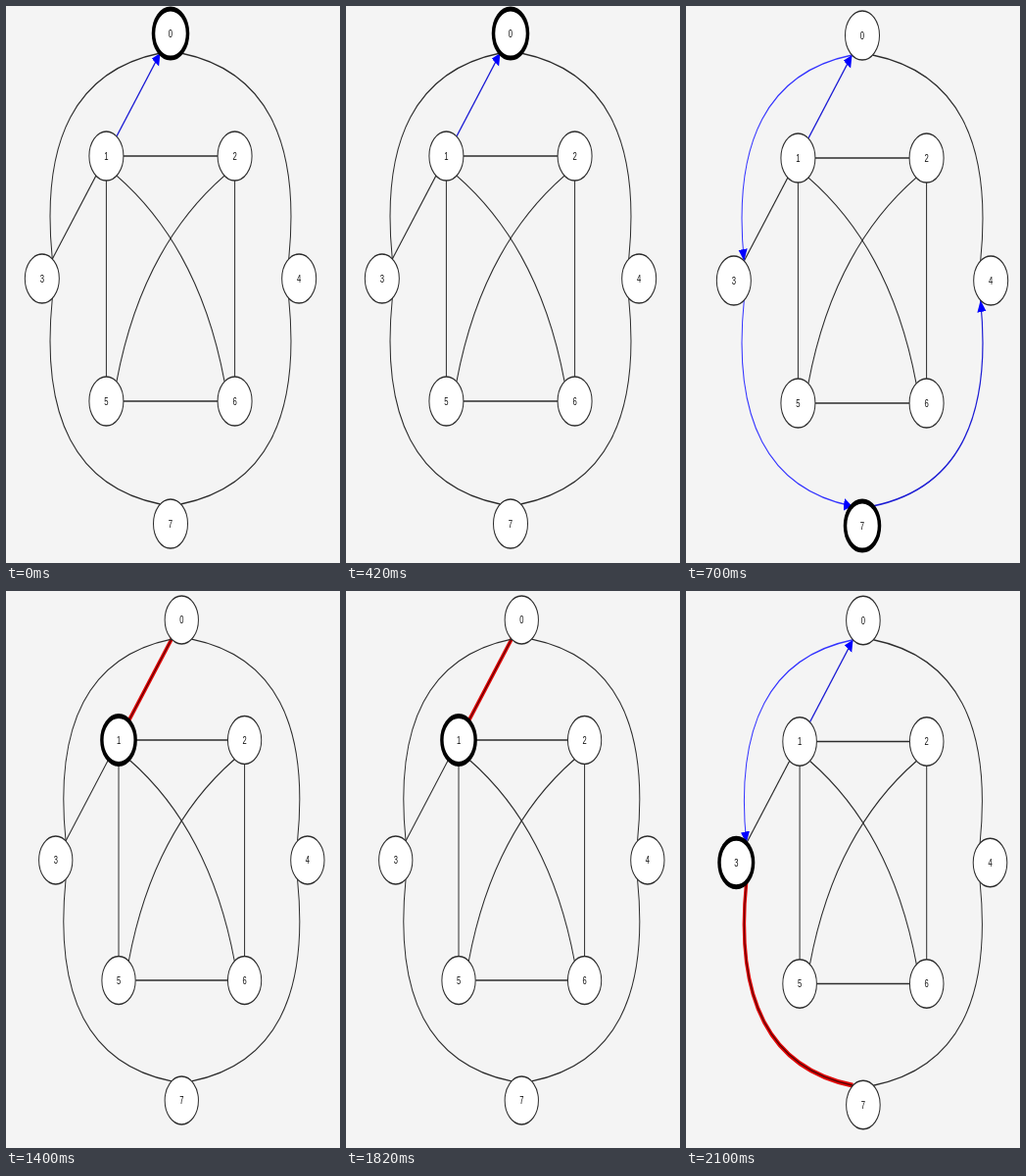
Write an HTML page that moves like this. It is 341 px wide and 568 px high and loops after 2.8 s.

```html
<!DOCTYPE html>
<html lang="en">
<head>
<meta charset="utf-8">
<title>Graph walk</title>
<style>
  html, body { margin: 0; width: 100%; height: 100%; overflow: hidden; background: #f4f4f4; }
  svg { display: block; width: 100%; height: 100%; }
  path { fill: none; stroke: #2c2c2c; stroke-width: 1.45; }
  path.thin { stroke: #33f; marker-end: url(#tip); }
  path.blue { stroke: #1c1cd4; stroke-width: 1.7; marker-end: url(#tip); }
  path.red { stroke: #e10808; stroke-width: 5; }
  path.core { stroke: #500; stroke-width: 1.4; }
  #tip path { fill: #00f; stroke: none; }
  circle { fill: #fff; stroke: #2c2c2c; stroke-width: 1.45; }
  circle.active { stroke: #000; stroke-width: 5; }
  text { font: 11px Arial, "Liberation Sans", sans-serif; text-anchor: middle; fill: #111; }
</style>
</head>
<body>
<svg viewBox="0 0 341 568" preserveAspectRatio="none">
  <defs>
    <marker id="tip" markerUnits="userSpaceOnUse" markerWidth="13" markerHeight="14"
            refX="12" refY="6.5" orient="auto">
      <path d="M0 0L12 6.5L0 13Z"/>
    </marker>
  </defs>
</svg>
<script>
const HOLD = 700;
const R = 25;
const svg = document.querySelector('svg');

const nodes = [[0, 0], [-1, 1], [1, 1], [-2, 2], [2, 2], [-1, 3], [1, 3], [0, 4]]
  .map(([col, row]) => [col * 93.7, row * 125]);

// From, to, sideways bend as a share of the length
const edges = [
  [1, 2, 0], [5, 6, 0], [1, 5, 0], [2, 6, 0], [1, 3, 0], [1, 0, 0],
  [1, 6, .2], [2, 5, -.2],
  [0, 3, -.5], [0, 4, .5], [3, 7, -.5], [7, 4, -.5]
];

const scenes = [
  { at: [168, 28], scale: 1, active: 0, marks: { '1-0': 'blue' } },
  { at: [180, 30], scale: 1, active: 7,
    marks: { '1-0': 'blue', '0-3': 'thin', '3-7': 'thin', '7-4': 'blue' } },
  { at: [179.3, 29.5], scale: .98, active: 1, marks: { '1-0': 'red' } },
  { at: [180.9, 30], scale: .988, active: 3,
    marks: { '1-0': 'blue', '0-3': 'thin', '3-7': 'red' } }
];

function add(parent, tag, attrs) {
  const el = document.createElementNS('http://www.w3.org/2000/svg', tag);
  for (const key in attrs) el.setAttribute(key, attrs[key]);
  return parent.appendChild(el);
}

// Runs from rim to rim, bowed at right angles to the line between the centres
function edgePath(a, b, bend) {
  const [x1, y1] = nodes[a], [x2, y2] = nodes[b];
  const dx = x2 - x1, dy = y2 - y1, len = Math.hypot(dx, dy);
  const ux = dx / len, uy = dy / len, bow = bend * (len - 2 * R);
  const cx = (x1 + x2) / 2 + uy * bow, cy = (y1 + y2) / 2 - ux * bow;
  return `M${x1 + ux * R} ${y1 + uy * R}Q${cx} ${cy} ${x2 - ux * R} ${y2 - uy * R}`;
}

function draw({ at, scale, active, marks }) {
  const g = add(svg, 'g', { transform: `translate(${at}) scale(${scale * .7} ${scale})` });
  for (const [a, b, bend] of edges) {
    const d = edgePath(a, b, bend), mark = marks[`${a}-${b}`] || '';
    add(g, 'path', { d, class: mark });
    if (mark === 'red') add(g, 'path', { d, class: 'core' });
  }
  nodes.forEach(([x, y], i) => {
    add(g, 'circle', { cx: x, cy: y, r: R, class: i === active ? 'active' : '' });
    add(g, 'text', { x, y: y + 3.8 }).textContent = i;
  });
  return g;
}

const total = HOLD * scenes.length;
scenes.forEach((scene, i) => {
  draw(scene).animate([
    { opacity: 1, offset: 0, easing: 'step-end' },
    { opacity: 0, offset: 1 / scenes.length },
    { opacity: 0, offset: 1 }
  ], { duration: total, delay: i ? i * HOLD - total : 0, iterations: Infinity });
});
</script>
</body>
</html>
```
